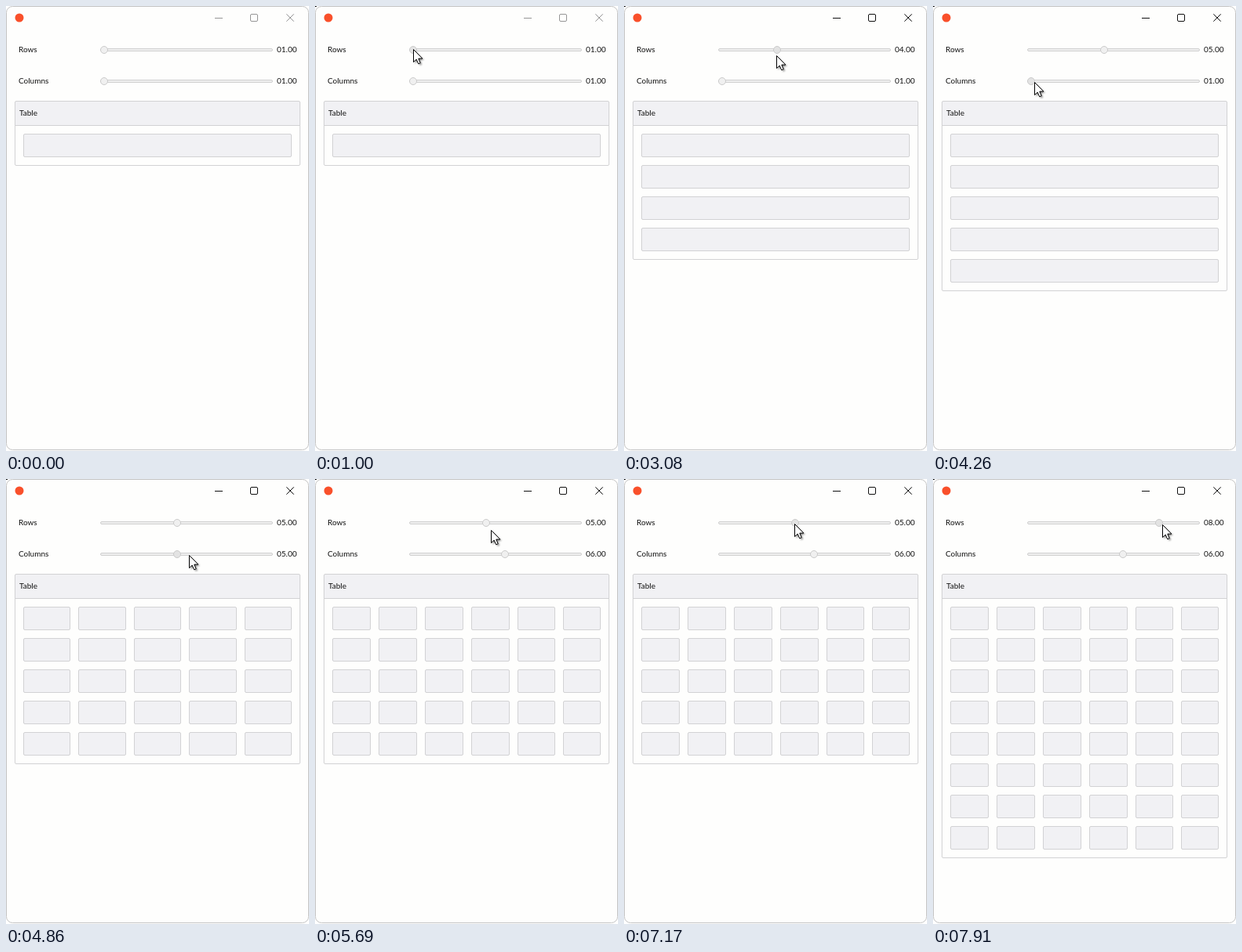
Write an HTML page that moves like this. It is 386 px wide and 568 px high and loops after 8 s.

```html
<!DOCTYPE html>
<html lang="en">
<head>
<meta charset="utf-8">
<title>Table with row and column sliders</title>
<style>
html, body { margin: 0; width: 100%; height: 100%; overflow: hidden; background: #fff; }
svg { display: block; }
text { font: 10px Lato, "Open Sans", sans-serif; fill: #111; }
.line { fill: none; stroke: #d2d2d4; }
.panel { fill: #f1f1f4; }
.cell { fill: #f1f1f4; stroke: #d2d2d4; }
.track { fill: #efefef; stroke: #d0d0d0; }
.thumb { stroke: #cbcbcb; }
</style>
</head>
<body>
<svg id="stage" width="386" height="568" viewBox="0 0 386 568">
  <defs>
    <filter id="blur" x="-50%" y="-50%" width="200%" height="200%">
      <feGaussianBlur stdDeviation="1.1"/>
    </filter>
    <path id="arrow" d="M.5 .5V16.6L4.2 13.1L6.7 18.8L9.2 17.7L6.8 12.1H11.9Z"/>
  </defs>
  <rect x=".5" y=".5" width="385" height="566" rx="8" fill="#fefefd" stroke="#c3c3c3"/>
  <circle cx="17" cy="15" r="5.5" fill="#f9502b"/>
  <g id="buttons" fill="none">
    <path d="M266 15.5H276"/>
    <rect x="311.5" y="10.5" width="9" height="9" rx="1.5"/>
    <path d="M357.3 10.3L366.7 19.7M366.7 10.3L357.3 19.7"/>
  </g>
  <g id="sliders"></g>
  <path class="panel" d="M12 153V122H374V153Z"/>
  <path class="line" d="M12 152.5H374"/>
  <rect id="frame" class="line" x="11.5" y="121.5" width="363" rx="1.5"/>
  <text x="17" y="140">Table</text>
  <g id="cells"></g>
  <g id="cursor">
    <rect id="corner" width="2" height="1" fill="#111"/>
    <g id="pointer">
      <use href="#arrow" x="2" y="2" fill="#000" opacity=".45" filter="url(#blur)"/>
      <use href="#arrow" fill="#fff" stroke="#000"/>
    </g>
  </g>
</svg>
<script>
const LOOP = 8000, ENTER = 170, FOCUS = 1040;
const LEFT = 125, STEP = 210 / 9, GAP = 10, INNER = 342;
const ROWS = 0, COLS = 1;
const $ = id => document.getElementById(id);

// Pointer stops; "drag" names the slider held on the way there
const stops = [
  { t: ENTER, x: 205, y: 566 },
  { t: 950, x: 125, y: 55 },
  { t: 2470, x: 125, y: 62 },
  { t: 3420, x: 233, y: 63, drag: ROWS },
  { t: 3640, x: 220, y: 63, drag: ROWS },
  { t: 4080, x: 128, y: 97 },
  { t: 4260, x: 129, y: 97 },
  { t: 4950, x: 248, y: 97, drag: COLS },
  { t: 5170, x: 248, y: 97 },
  { t: 5910, x: 218, y: 57 },
  { t: 6040, x: 218, y: 57 },
  { t: 6700, x: 147, y: 57, drag: ROWS },
  { t: 7650, x: 289, y: 58, drag: ROWS },
  { t: 7910, x: 292, y: 58 }
];

const ease = k => k * k * (3 - 2 * k);
const thumbX = value => Math.round(LEFT + (value - 1) * STEP);
const valueAt = x => Math.max(1, Math.min(10, 1 + Math.round((x - LEFT) / STEP)));

function add(parent, tag, attrs, label) {
  const el = document.createElementNS("http://www.w3.org/2000/svg", tag);
  for (const key in attrs) el.setAttribute(key, attrs[key]);
  if (label) el.textContent = label;
  return parent.appendChild(el);
}

function makeSlider(label, y) {
  const box = $("sliders");
  add(box, "text", { x: 16, y: y + 3 }, label);
  add(box, "rect", { class: "track", x: 120.5, y: y - 1.5, width: 219, height: 3, rx: 1.5 });
  return {
    y,
    thumb: add(box, "circle", { class: "thumb", cy: y, r: 4.5 }),
    text: add(box, "text", { x: 345, y: y + 3 })
  };
}

const sliders = [makeSlider("Rows", 56), makeSlider("Columns", 96)];

// Replays the pointer up to time t and applies its drags
function stateAt(t) {
  const values = [1, 1];
  let { x, y } = stops[0], held, grab = 0;
  for (let i = 1; i < stops.length && t >= stops[i - 1].t; i++) {
    const a = stops[i - 1], b = stops[i];
    const k = Math.min(1, (t - a.t) / (b.t - a.t));
    const dragging = b.drag !== undefined;
    const f = dragging ? k : ease(k);
    x = a.x + (b.x - a.x) * f;
    y = a.y + (b.y - a.y) * f;
    if (dragging) {
      if (held !== b.drag) grab = a.x - thumbX(values[b.drag]);
      values[b.drag] = valueAt(x - grab);
    }
    held = b.drag;
  }
  return { x: Math.round(x), y: Math.round(y), values, held };
}

// Left edge of column c; spare pixels are spread out or go to the first columns
function columnX(c, cols) {
  const width = (INNER - GAP * (cols - 1)) / cols;
  const whole = Math.floor(width), part = width - whole;
  const spare = part < 0.5 ? Math.round(part * c) : Math.min(c, Math.round(part * cols));
  return 22 + c * (whole + GAP) + spare;
}

let shape = "";
function drawTable(rows, cols) {
  if (shape === rows + "x" + cols) return;
  shape = rows + "x" + cols;
  $("frame").setAttribute("height", 42 + 40 * rows);
  const box = $("cells");
  box.replaceChildren();
  for (let r = 0; r < rows; r++) {
    for (let c = 0; c < cols; c++) {
      const x = columnX(c, cols);
      add(box, "rect", {
        class: "cell", x: x + 0.5, y: 163.5 + 40 * r,
        width: columnX(c + 1, cols) - GAP - x - 1, height: 29, rx: 1.5
      });
    }
  }
}

function render(t) {
  const { x, y, values, held } = stateAt(t);
  const shown = t >= ENTER;
  $("cursor").setAttribute("visibility", shown ? "visible" : "hidden");
  $("pointer").setAttribute("transform", `translate(${x} ${y})`);
  $("buttons").setAttribute("stroke", t < FOCUS ? "#969696" : "#111");
  sliders.forEach((s, i) => {
    const cx = thumbX(values[i]);
    const hot = held === i || Math.hypot(x - cx, y - s.y) < 6;
    s.thumb.setAttribute("cx", cx);
    s.thumb.setAttribute("fill", hot ? "#e3e3e3" : "#f0f0f0");
    s.text.textContent = values[i].toFixed(2).padStart(5, "0");
  });
  drawTable(values[ROWS], values[COLS]);
}

const begin = performance.now();
function tick() {
  render((performance.now() - begin) % LOOP);
  requestAnimationFrame(tick);
}
tick();
</script>
</body>
</html>
```
